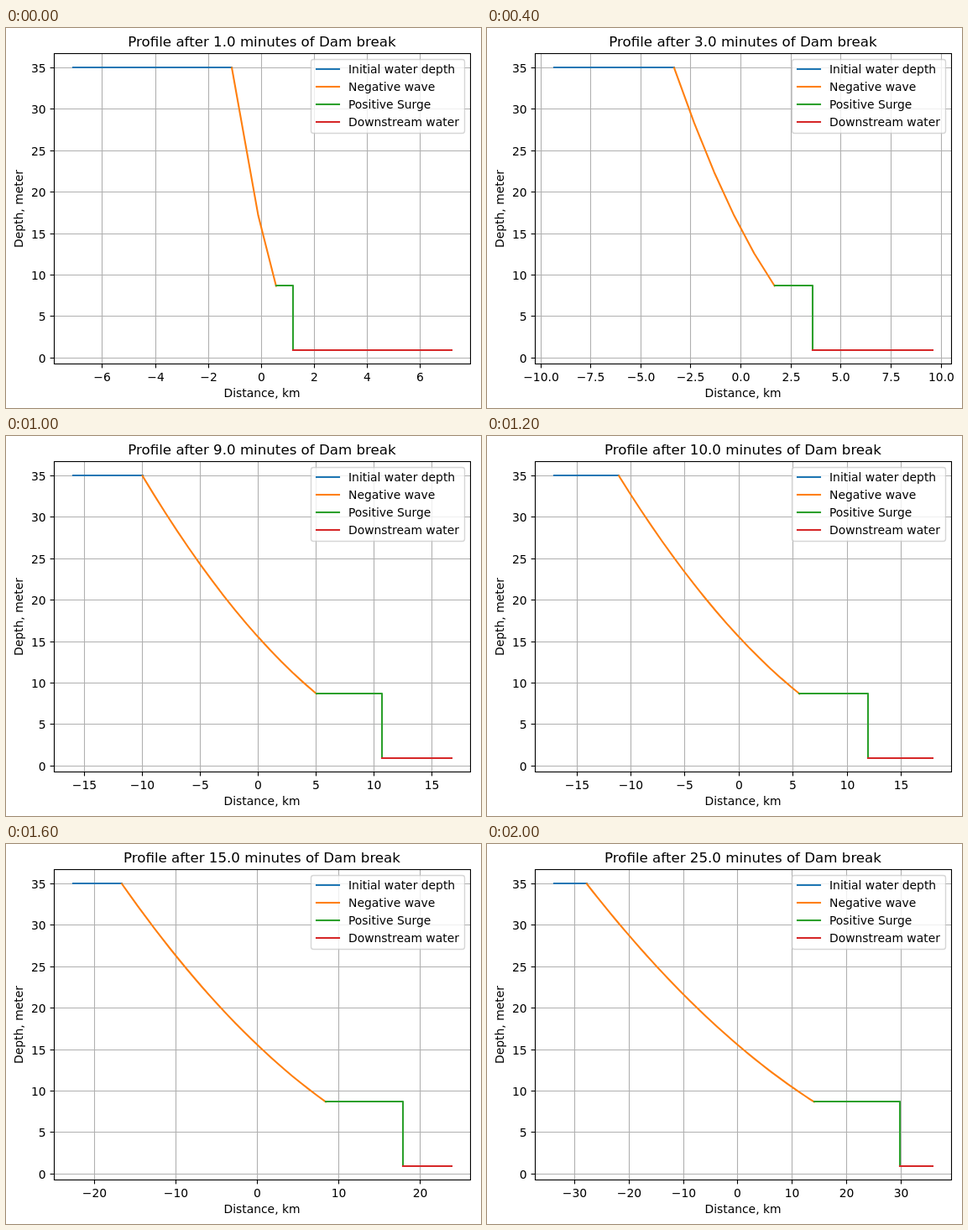
Animation, 566 px wide and 453 px high, one loop 2.2 s. Source, as an HTML page:

```html
<!DOCTYPE html>
<html lang="en">
<head>
<meta charset="utf-8">
<title>Dam break profile</title>
<style>
  html, body { margin: 0; width: 100%; height: 100%; overflow: hidden; background: #fff; }
  svg { display: block; width: 566px; height: 453px; }
  text { font: 13.89px "DejaVu Sans", sans-serif; fill: #000; }
  .title { font-size: 16.67px; }
  .mid { text-anchor: middle; }
  .end { text-anchor: end; }
  .grid { stroke: #b0b0b0; stroke-width: 1.11; }
  .tick { stroke: #000; stroke-width: 1.11; }
  .line { fill: none; stroke-width: 2.08; stroke-linecap: square; stroke-linejoin: round; }
</style>
</head>
<body>
<svg id="stage" viewBox="0 0 566 453"></svg>
<script>
const MINUTES = [1, 2, 3, 5, 7, 9, 10, 12, 15, 20, 25];
const HOLD = 200;
const G = 9.81, DEPTH = 35, SURGE = 8.7, TAIL = 1, REACH = 6;
const LEFT = 57.4, WIDTH = 496, TOP = 30.5, BOTTOM = 400.5, HEIGHT = 369.6;

// Speeds in km per minute
const KM = 0.06;
const c0 = Math.sqrt(G * DEPTH);
const backSpeed = c0 * KM;
const surgeSpeed = (2 * c0 - 3 * Math.sqrt(G * SURGE)) * KM;
const frontSpeed = 1.191;

const SERIES = [
  ["Initial water depth", "#1f77b4"],
  ["Negative wave", "#ff7f0e"],
  ["Positive Surge", "#2ca02c"],
  ["Downstream water", "#d62728"]
];

const stage = document.getElementById("stage");

function add(parent, tag, attrs, text) {
  const el = document.createElementNS("http://www.w3.org/2000/svg", tag);
  for (const k in attrs) el.setAttribute(k, attrs[k]);
  if (text !== undefined) el.textContent = text;
  parent.appendChild(el);
  return el;
}
const seg = (parent, cls, x1, y1, x2, y2) =>
  add(parent, "line", { class: cls, x1, y1, x2, y2 });
const label = (parent, cls, x, y, text) => add(parent, "text", { class: cls, x, y }, text);
const crisp = v => Math.floor(v) + 0.5;
const py = d => 400.3 - (d + 0.7) * HEIGHT / 37.4;
const signed = (v, digits) => (v < 0 ? "\u2212" : "") + Math.abs(v).toFixed(digits);

const grid = add(stage, "g", {});
const ticks = add(stage, "g", {});

for (let d = 0; d <= 35; d += 5) {
  const y = crisp(py(d));
  seg(stage, "grid", 57.5, y, 553.5, y);
  seg(stage, "tick", 52.6, y, 57.5, y);
  label(stage, "end", 47.7, y + 5, d);
}

const lines = SERIES.map(s => add(stage, "path", { class: "line", stroke: s[1] }));

add(stage, "rect", { x: 57.5, y: TOP, width: 496, height: BOTTOM - TOP,
  fill: "none", stroke: "#000", "stroke-width": 1.11 });
const title = label(stage, "title mid", 305, 22, "");
label(stage, "mid", 305, 440, "Distance, km");
add(stage, "text", { class: "mid", transform: "translate(20 215.5) rotate(-90)" }, "Depth, meter");

add(stage, "rect", { x: 363.5, y: 37.5, width: 183, height: 88, rx: 2.8,
  fill: "#fff", stroke: "#ccc", "stroke-width": 1.39, opacity: 0.8 });
SERIES.forEach(([name, color], i) => {
  const y = 49 + 21 * i;
  add(stage, "path", { class: "line", stroke: color, d: `M370 ${y}H397` });
  label(stage, "", 408, y + 5, name);
});

function draw(min) {
  const back = -backSpeed * min, surge = surgeSpeed * min, front = frontSpeed * min;
  const lo = back - REACH, hi = front + REACH;
  const range = (hi - lo) * 1.1, start = lo - (hi - lo) * 0.05;
  const px = x => LEFT + (x - start) / range * WIDTH;
  const at = (x, d) => `${px(x).toFixed(2)} ${py(d).toFixed(2)}`;
  const snap = (x, d) => `${Math.round(px(x))} ${Math.round(py(d))}`;

  title.textContent = `Profile after ${min.toFixed(1)} minutes of Dam break`;

  // The wave is sampled once per kilometre
  const wave = [];
  for (let x = back; x < surge; x++) {
    wave.push(at(x, (2 * c0 - x / min / KM) ** 2 / (9 * G)));
  }
  wave.push(at(surge, SURGE));

  [
    [snap(lo, DEPTH), snap(back, DEPTH)],
    wave,
    [snap(surge, SURGE), snap(front, SURGE), snap(front, TAIL)],
    [snap(front, TAIL), snap(hi, TAIL)]
  ].forEach((pts, i) => lines[i].setAttribute("d", "M" + pts.join("L")));

  grid.textContent = ticks.textContent = "";
  const step = [2, 2.5, 5, 10].find(s => s >= range / 9);
  const digits = step % 1 ? 1 : 0;
  for (let x = Math.ceil(start / step) * step; x <= start + range; x += step) {
    const p = crisp(px(x));
    seg(grid, "grid", p, TOP, p, BOTTOM);
    seg(ticks, "tick", p, BOTTOM, p, BOTTOM + 4.9);
    label(ticks, "mid", p, 421, signed(x, digits));
  }
}

let shown = -1;
const origin = performance.now();
function frame() {
  const t = Math.max(0, performance.now() - origin);
  const i = Math.floor(t / HOLD) % MINUTES.length;
  if (i !== shown) draw(MINUTES[shown = i]);
  requestAnimationFrame(frame);
}
frame();
</script>
</body>
</html>
```
